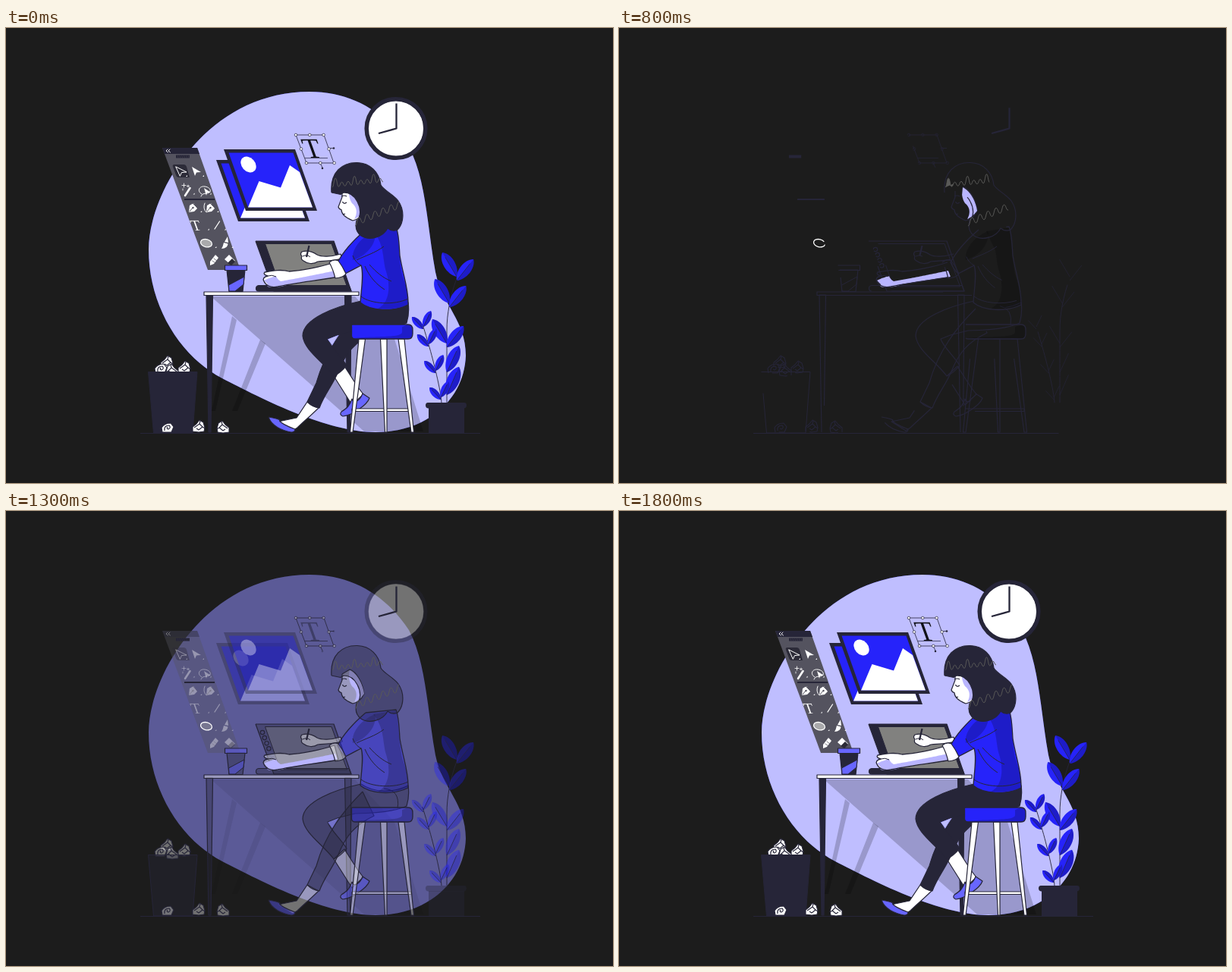
An HTML page for the animation above (3.2 s loop, 800 by 600 pixels).

```html
<!DOCTYPE html>
<html lang="en">
<head>
<meta charset="utf-8">
<title>Designer at work</title>
<style>
  html, body { margin: 0; width: 100%; height: 100%; overflow: hidden; background: #1c1c1c; }
  svg { display: block; width: 800px; height: 600px; --p: 1; --f: 1; }
  .fill { fill-opacity: calc(var(--f) * var(--a, 1)); }
  .line { stroke-dasharray: var(--p) 2; }
  .fade { opacity: var(--f); }
</style>
</head>
<body>
<svg id="stage" viewBox="0 0 800 600"></svg>
<script>
const stage = document.getElementById('stage');
const NAVY = '#262538', BLUE = '#2623fa', PALE = '#b9b5ff', WHITE = '#fff',
      GREY = '#5a5a58', PANEL = '#54535f';

function add(tag, attrs, parent = stage) {
  const el = document.createElementNS('http://www.w3.org/2000/svg', tag);
  for (const k in attrs) el.setAttribute(k, attrs[k]);
  parent.appendChild(el);
  return el;
}
const fill = (d, color, alpha = 1) => add('path', { d, fill: color, class: 'fill', style: `--a:${alpha}` });
const dim = d => fill(d, '#000', .2);
const line = (d, color = NAVY, width = 1.2) => add('path', {
  d, fill: 'none', stroke: color, 'stroke-width': width,
  'stroke-linejoin': 'round', pathLength: 1, class: 'line'
});
function shape(d, color, width = 1.2) {
  fill(d, color);
  line(d, NAVY, width);
}
// Blue lightened by a white layer on top.
function tint(d, white) {
  fill(d, '#2724ff');
  fill(d, WHITE, white);
}
function tintShape(d, width) {
  tint(d, .3);
  line(d, NAVY, width);
}
const poly = (...n) => 'M' + n.join(' ') + 'Z';
const curve = (n, at) => 'M' + Array.from({ length: n + 1 }, (_, i) => at(i / n).map(v => v.toFixed(1)).join(' ')).join('L');
const circle = (x, y, r) => `M${x - r} ${y}a${r} ${r} 0 1 1 ${2 * r} 0a${r} ${r} 0 1 1 ${-2 * r} 0Z`;

// Solid areas that grow along their own outline.
const SAMPLES = 120, trims = [];
function trim(d, color, opacity = 1) {
  const path = add('path', { d, fill: 'none' });
  const len = path.getTotalLength(), pts = [];
  for (let i = 0; i <= SAMPLES; i++) {
    const q = path.getPointAtLength(len * i / SAMPLES);
    pts.push(q.x.toFixed(1) + ',' + q.y.toFixed(1));
  }
  path.remove();
  trims.push({ pts, el: add('polygon', { fill: color, 'fill-opacity': opacity }) });
}

function room() {
  tint('M400 84C455 84 500 110 531 157C554 200 555 262 566 322C575 366 606 385 606 432' +
    'C604 490 555 533 487 533C420 533 330 485 285 462C228 432 188 365 188 292C188 217 264 84 400 84Z', .7);
  dim(poly(270, 354, 460, 354, 512, 410, 550, 532, 472, 532));
  dim(poly(298, 380, 304, 385, 276, 505, 271, 505));
  dim(poly(335, 411, 342, 416, 305, 505, 298, 505));
}

function clock() {
  fill(circle(514, 132.5, 36.5), WHITE);
  add('circle', { cx: 514, cy: 132.5, r: 38.8, fill: 'none', stroke: NAVY, 'stroke-width': 5.5, class: 'fade' });
  line('M491 139L514.5 132.5V99.5', NAVY, 2.3);
}

function picture(x, y) {
  const at = (...n) => poly(...n.map((v, i) => v + (i % 2 ? y : x)));
  fill(at(287, 160, 381, 160, 410, 241, 316, 241), NAVY);
  fill(at(293.5, 164.5, 378.5, 164.5, 404, 236.5, 319, 236.5), BLUE);
  fill(at(319, 236.5, 333.5, 202, 362, 210.5, 374, 181, 387, 190, 404, 236.5), WHITE);
  add('ellipse', {
    rx: 11.6, ry: 8.8, fill: WHITE, class: 'fill',
    transform: `translate(${319.5 + x} ${180 + y}) rotate(48)`
  });
}

function serifT(x, y, size, color) {
  add('text', {
    'font-family': '"Liberation Serif", "Noto Serif", serif', 'font-size': size,
    'text-anchor': 'middle', fill: color, class: 'fill', transform: `matrix(1 0 .36 1 ${x} ${y})`
  }).textContent = 'T';
}

function textBox() {
  line('M382 141H419L432 178H396Z', NAVY, .8);
  line('M425.5 158.5H432M414 178L417 184', NAVY, .8);
  line('M394 171.5H424', NAVY, .7);
  serifT(407.5, 171, 37, '#111118');
  for (let row = 0; row < 3; row++)
    for (let col = 0; col < 3; col++)
      if (row !== 1 || col !== 1)
        shape(circle(382 + 18.3 * col + 7 * row, 141 + 18.5 * row, 1.8), WHITE, .7);
  fill(circle(432, 158.5, 1.3) + circle(417, 185, 1.3), NAVY);
}

const icon = (d, color = WHITE) => add('path', { d, fill: color, class: 'fade' });
const mark = (d, width = 1, color = WHITE) => add('path', {
  d, fill: 'none', stroke: color, 'stroke-width': width,
  'stroke-linecap': 'round', 'stroke-linejoin': 'round', class: 'fade'
});

function toolbar() {
  fill(poly(206, 158, 252, 158, 309, 319, 266, 319), PANEL);
  fill(poly(206, 158, 252, 158, 255, 166, 209, 166), NAVY);
  mark('M213 160l-2 2 2.5 2M216 160l-2 2 2.5 2', .9);
  line('M224 169.5H242', NAVY, 4);
  for (let x = 226; x < 242; x += 2.8) mark(`M${x} 168l1 3`, .6, '#45444f');
  icon('M222 180H234Q237 180 238 183L242 197H228Q225 197 224 194L220 183Q219 180 222 180Z', '#2c2b38');
  mark('M224 183L238 190 231.5 190.5 229.5 195Z');
  icon('M245 183L257 190 251 190.5 249 195Z');
  // wand and lasso
  mark('M236 221L242.5 211', 2.6);
  mark('M234.500 205v5M232 207.500h5M240 207v3M238.500 208.500h3M233 212v2', .8);
  mark('M258 219C251 215 255 208 262 209C270 210 272 217 265 218Q258 218 257 222');
  icon('M261 211L270 217 265 217 264 221Z');
  line('M235 226H275', NAVY, 2);
  // pens
  for (const x of [246, 269]) {
    icon(`M${x - 5} 243L${x - 4} 234 ${x + 1} 231 ${x + 6} 238 ${x + 2} 242Z`);
    mark(`M${x - 4} 242L${x} 237m-1 -7l7 7`, 1, PANEL);
    icon(circle(x + .5, 237, 1.2), PANEL);
  }
  mark('M262 231Q259 238 264 243');
  serifT(252.5, 267, 20, WHITE);
  mark('M275 265L281.5 255', 1.3);
  // ellipse, brush, pencil, eraser
  const oval = { rx: 7.6, ry: 5, transform: 'translate(264 283.7) rotate(14)' };
  add('ellipse', { ...oval, fill: '#a9a9ab', class: 'fill' });
  add('ellipse', { ...oval, fill: 'none', stroke: WHITE, 'stroke-width': 1.3, pathLength: 1, class: 'line' });
  icon('M292 275L293 283 288 282Z');
  icon('M287 283L292.5 284.5Q292 291 284 291Q286 288 287 283Z');
  icon('M269 313L269 308 276 299 280 303 274 311Z');
  mark('M272 307l4 3M274 304l4 3', .8, PANEL);
  icon('M288 305L294 299 302 307 296 312Z');
  icon('M292 310L297 313 302 308 298 304Z', '#2c2b38');
  for (let row = 0; row < 5; row++)
    for (const x of [237, 259]) icon(`M${x + 9.6 * row} ${196 + 23.5 * row}l2-2v2Z`);
}

const ballEdge = 'M-8 7L-8 1L-3 -3L1 -8L6 -5L8 2L7 7L0 8Z';
function ball(x, y, flip = 1) {
  const g = add('g', { transform: `translate(${x} ${y}) scale(${flip} 1)` });
  add('path', { d: ballEdge, fill: WHITE, class: 'fill' }, g);
  for (const d of [ballEdge, 'M-6 2L1 -3L5 1L0 5L-3 3M1 -3L2 -7M5 1L8 3'])
    g.appendChild(line(d, NAVY, 1.1));
}
function swirl(x, y) {
  shape(`M${x - 7} ${y + 6}l-1 -6q4 -6 12 -6l4 5l-3 7Z`, WHITE);
  line(`M${x - 4} ${y + 4}q-1 -7 6 -7q3 3 -1 5q-3 -1 -1 -3`);
}

function bin() {
  ball(212, 440);
  swirl(204, 449);
  ball(219, 451, -1);
  ball(235, 447);
  shape(poly(187.5, 453.5, 252, 453.5, 246, 534, 194.5, 534), NAVY, 1);
  swirl(213, 527);
  ball(254, 525);
  ball(286, 526, -1);
}

function leaf(x, y, dx, dy) {
  const at = (u, v) => `${(x + dx * u - dy * v).toFixed(1)} ${(y + dy * u + dx * v).toFixed(1)}`;
  const half = v => `M${at(0, 0)}C${at(.25, v)} ${at(.8, v)} ${at(1, 0)}`;
  fill(half(.27) + half(-.27), BLUE);
  dim(half(.27) + 'Z');
  line(`M${at(0, 0)}L${at(.8, 0)}`, NAVY, .7);
}

function plant() {
  const tall = y => 581 + 15 * (Math.max(0, 400 - y) / 75) ** 2;
  const small = y => 574 - 24 * ((494 - y) / 100) ** 1.3;
  line(curve(20, u => [tall(494 - 172 * u), 494 - 172 * u]), NAVY, .9);
  line(curve(20, u => [small(494 - 104 * u), 494 - 104 * u]), NAVY, .9);
  for (const y of [330, 365, 418]) {
    leaf(tall(y), y - 2, -19, -32);
    leaf(tall(y), y + 3, 22, -28);
  }
  for (const y of [454, 484]) leaf(tall(y), y, 16, -y / 13);
  for (const y of [394, 417, 452, 487]) {
    leaf(small(y), y + 3, -15, -16);
    leaf(small(y), y, 10, -21);
  }
  fill('M556 494H604Q607 494 607 497.5T604 501.5H556Q553 501 553 497.5T556 494Z', NAVY);
  fill(poly(557, 501, 604, 501, 604, 534, 557, 534), NAVY);
}

function desk() {
  shape(poly(267, 533, 264, 352, 272.5, 352, 270, 533), NAVY);
  shape(poly(450, 533, 446.5, 352, 455, 352, 453.5, 533), NAVY);
  shape(poly(329, 281, 432, 281, 455, 347, 353, 347), NAVY);
  shape(poly(341.5, 284.5, 429, 284.5, 449.5, 341, 361.5, 341), '#81817f', 1);
  for (let i = 0; i < 4; i++) line(circle(338 + i * 2.8, 292 + i * 7.1, 2.7), NAVY, 1.2);
  shape('M333 347Q329.5 347 329.5 343.5T333 339.5H452L455 347Z', NAVY);
  shape(poly(291, 319, 315, 319, 312, 347.5, 294, 347.5), NAVY);
  tintShape(poly(293.5, 339, 314, 328, 313, 338, 302, 347, 294, 347), 1);
  tintShape(poly(288.5, 313, 317.5, 313, 317.5, 319.5, 288.5, 319.5));
  shape(poly(465, 352.5, 261, 352.5, 261, 348, 465, 348), WHITE);
}

function legs() {
  shape('M397 493L412 501C402 511 392 519 384 527L378 531L359 519L383 514Z', WHITE);
  tintShape('M346 513C352 514 358 515 361 517C358 519 372 526 381 529Q381 533 376 533C364 531 350 525 346 513Z');
  shape('M432 459L446 446L464 474L471 483L456 497Z', WHITE);
  tintShape('M470 482L479 488C476 497 456 511 444 512Q439 510 442 506C450 501 453 498 456 489C457 496 466 493 470 482Z');
  shape('M470 370C445 395 421 425 409 468L397 493Q404 500 413 501C420 482 430 472 438 453C448 428 460 414 485 402Z', NAVY);
  shape('M468 360C435 367 391 383 391 406C393 425 418 440 432 459Q441 455 449 445C440 431 427 420 424 410C432 407 436 405 440 404' +
    'L460 399C500 398 520 393 528 389Q532 376 530 362C510 372 485 372 468 360Z', NAVY);
  tint(poly(424, 410.5, 438, 405, 430, 418), .7);
  line('M516 392Q520 368 498 366', NAVY, 1);
}

function stool() {
  const leg = (a, b, c, d) => shape(poly(a, 410, b, 410, c, 533, d, 533), WHITE);
  shape(poly(456, 502, 534, 502, 534, 505.5, 456, 505.5), WHITE, 1);
  leg(465, 473.5, 457, 453.5);
  leg(493.5, 502, 502, 499.5);
  leg(517, 525, 537.5, 534);
  const seat = 'M457 391H530Q536 391 536 398V403Q536 410 530 410H460Q455 410 455.5 404V393Q455 391 457 391Z';
  fill(seat, BLUE);
  trim('M458 409C485 406 522 409 522 401V394L530 391Q536 393 536 398V403Q536 410 530 410Z', '#000', .2);
  line(seat, NAVY, 1.3);
}

function head() {
  shape('M443 215L443 223L438 236Q439 239 442 239.5C442 246 447 250 457 254C464 253 469 247 472 241C470 226 462 212 453 209Z', WHITE);
  trim('M453 210C463 215 470 228 472 241Q466 249 459 252C464 243 462 236 456 231C452 225 451 217 453 210Z', PALE);
  line('M443.5 229Q445 233 449 230M442 222Q446 220 449 222M444 246L447 245', NAVY, 1.2);
  shape('M429 217C427 190 443 177 463 177.5C480 178 492 190 494 207C498 214 510 219 517 228C526 241 524 258 516 266Q509 269 503 264' +
    'C497 276 479 281 468 274C461 269 460 262 462 254C468 249 468 238 463 229C459 221 452 217 445 217L441 219.5Z', NAVY);
}

// Rounded zigzag along a line; every second point rises by height(j).
function zigzag(x0, y0, x1, y1, n, height) {
  const pts = Array.from({ length: n + 1 }, (_, i) => {
    const u = i / n;
    return [x0 + (x1 - x0) * u, y0 + (y1 - y0) * u - (i % 2 ? height((i - 1) / 2) : 0)];
  });
  const wave = (list, first) => list.reduce((d, [x, y], i) => {
    if (!i) return first + x + ' ' + y;
    const [ax, ay] = list[i - 1], m = (ax + x) / 2;
    return d + `C${m} ${ay} ${m} ${y} ${x} ${y}`;
  }, '');
  return { out: wave(pts, 'M'), back: wave(pts.slice().reverse(), 'L') };
}
function curls() {
  const fringe = zigzag(430, 210, 497, 203, 16, j => 7.5 + 4 * Math.cos(2.1 * j));
  trim(fringe.out + fringe.back, GREY);
  line(fringe.out, GREY, 1);
  line(zigzag(460, 261, 518, 238, 11, () => 9).out, GREY, 1);
}

function body() {
  // far arm with pen
  shape('M441 298C428 302 416 302 410 299C403 294 397 293 390 295Q387 298 390 301Q388 305 392 307C397 311 405 312 411 308C421 307 431 307 443 304Z', WHITE);
  line('M399.5 287L396 302', NAVY, 2.2);
  line('M391 301Q397 298 401 302', NAVY, 1);

  const shirt = 'M474 266C460 278 446 292 437 309Q441 318 447 324C457 319 464 315 468 313C472 325 468 345 467 362' +
    'C480 373 510 375 530 365C531 345 523 325 519 300C518 285 518 272 514 262Z';
  fill(shirt, BLUE);
  trim('M484 268L514 263C518 280 517 300 522 325C527 340 531 352 530 365C518 370 505 371 490 370' +
    'C508 361 506 335 500 318C496 300 498 285 484 268Z', '#000', .2);
  trim('M457 306C455 292 467 276 486 268C490 280 478 300 457 306Z', '#000', .2);
  line(shirt, NAVY, 1.3);
  const folds = ['M468 354C480 364 512 366 530 357', 'M468 313C462 310 459 305 457 300',
    'M498 288C486 297 474 300 462 306', 'M473 314C479 328 488 338 499 345', 'M479 312C488 322 496 329 508 334'];
  for (const d of folds) line(d, NAVY, 1);

  // near arm
  const arm = 'M433 309C415 315 390 320 373 321C363 318 352 320 341 322Q338 325 345 327Q337 329 340 334' +
    'C342 339 348 343 358 341C380 336 410 333 438 328Z';
  fill(arm, WHITE);
  trim('M362 334Q357 331 356 327Q345 330 340 333Q343 336 345 338Q343 341 346 341.5Q362 343 372 338' +
    'C390 335 415 331 437 328L434 320C410 325 385 330 362 334Z', PALE);
  line(arm, NAVY, 1.3);
  line('M345 327Q351 325 356 328', NAVY, 1);
  shape('M426 309Q432 304 438 307Q444 315 448 324Q445 329 434 330Q431 318 426 309Z', WHITE);
}

room();
clock();
picture(-10, 14);
picture(0, 0);
textBox();
toolbar();
line('M177 534.5H625');
plant();
bin();
desk();
legs();
stool();
body();
head();
curls();

const STEP = 100, LOOP = 3200;
const clamp = v => Math.min(1, Math.max(0, v));
// Lines ease out over one second.
const drawn = t => 1 - (1 - clamp((t - 100) / 1000)) ** 1.9;
// Fills rise evenly over 600 ms, resting one step at 1200.
const filled = t => clamp((t - (t >= 1200 ? STEP : 0) - 975) / 600);

let shown = -1;
function show(t) {
  if (t === shown) return;
  shown = t;
  const p = t ? drawn(t) : 1;
  stage.style.setProperty('--p', p);
  stage.style.setProperty('--f', t ? filled(t) : 1);
  for (const { el, pts } of trims)
    el.setAttribute('points', pts.slice(0, Math.round(p * SAMPLES) + 1).join(' '));
}

const start = performance.now();
function tick() {
  const t = (performance.now() - start) % LOOP;
  show(t - t % STEP);
  requestAnimationFrame(tick);
}
tick();
</script>
</body>
</html>
```
